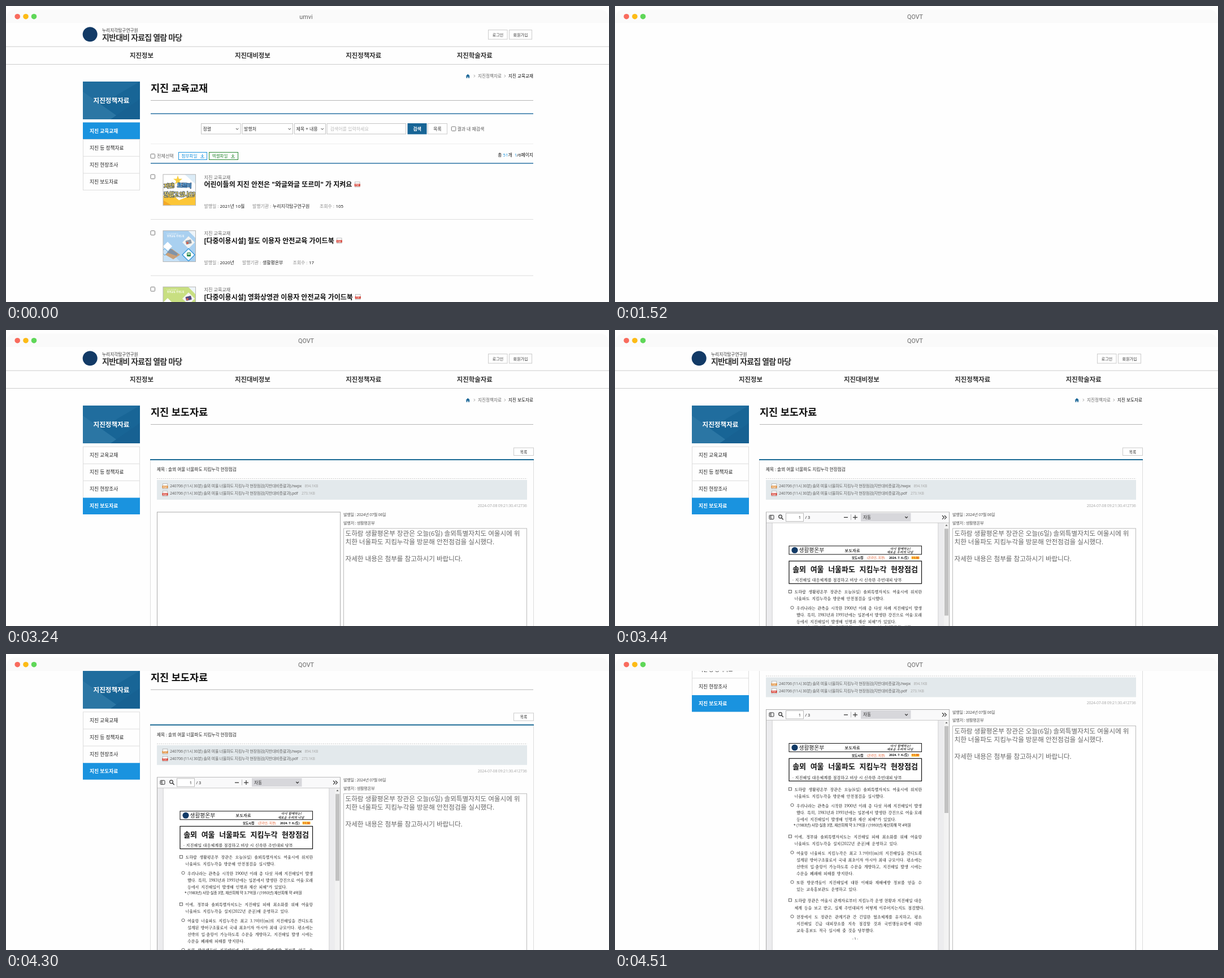
Write an HTML page that moves like this. It is 1067x525 px and loops after 5450 ms.

```html
<!DOCTYPE html>
<html lang="ko">
<head>
<meta charset="utf-8">
<style>
  html, body { margin: 0; width: 100%; height: 100%; overflow: hidden; background: #fefefe; }
  #stage { display: block; width: 100%; height: 100%; font-family: 'Noto Sans', 'Noto Sans CJK KR', sans-serif; }
  foreignObject { overflow: visible; }
  .line { font: 7px/12px 'Noto Serif CJK KR', 'Noto Sans CJK KR', serif; color: #000; white-space: nowrap; word-spacing: 1.5px; }
  .full { white-space: normal; word-spacing: 0; text-align: justify; text-align-last: justify; }
</style>
</head>
<body>
<svg id="stage" viewBox="0 0 1067 525"></svg>
<script>
const LOOP = 5450;
const BOLD = 'font-weight="700"', MID = ' text-anchor="middle"', END = ' text-anchor="end"';
const NAVY = '#186596', SKY = '#1a93df', RULE = '#2a72a3';
const SERIF = ` font-family="'Noto Serif CJK KR','Noto Sans CJK KR',serif"`;
const spacing = px => ` letter-spacing="${px}"`;

// Text is placed by the vertical centre of its glyphs.
const text = (x, y, s, size = 8, fill = '#333', more = '') =>
  `<text x="${x}" y="${y + size * .37}" font-size="${size}" fill="${fill}" ${more}>${s}</text>`;
const box = (x, y, w, h, fill = 'none', stroke = 'none', more = '') =>
  `<rect x="${x}" y="${y}" width="${w}" height="${h}" fill="${fill}" stroke="${stroke}" ${more}/>`;
const rule = (x1, x2, y, color, width = 1, more = '') =>
  `<path d="M${x1} ${y}H${x2}" stroke="${color}" stroke-width="${width}" ${more}/>`;
const stroke = (d, color = '#333', width = 1) =>
  `<path d="${d}" fill="none" stroke="${color}" stroke-width="${width}"/>`;
const poly = (points, fill, more = '') => `<polygon points="${points}" fill="${fill}" ${more}/>`;
const disc = (x, y, r, fill, more = '') => `<circle cx="${x}" cy="${y}" r="${r}" fill="${fill}" ${more}/>`;
const diamond = (x, y, r, fill, more) => poly(`${x - r},${y} ${x},${y - r} ${x + r},${y} ${x},${y + r}`, fill, more);
const checkbox = (x, y) => box(x, y, 7.5, 7.5, '#fff', '#777', 'rx="1.2"');
const fileIcon = (x, y, color = '#d5382c') =>
  box(x + .5, y - 4.5, 8.5, 9, '#fff', '#aaa', 'stroke-width=".8"') +
  box(x - .3, y - 1, 10, 4.2, color) + text(x + 4.7, y + 1.1, 'PDF', 3.6, '#fff', BOLD + MID);

const tabs = ['지진 교육교재', '지진 등 정책자료', '지진 현장조사', '지진 보도자료'];
const tower = '솔뫼 여울 너울파도 지킴누각 현장점검';

const lessons = [
  { title: '어린이들의 지진 안전은 "와글와글 또르미" 가 지켜요', icon: 617, date: '2021년 10월', orgX: 436, org: '누리지각탐구연구원', viewX: 555, views: 105 },
  { title: '[다중이용시설] 철도 이용자 안전교육 가이드북', icon: 585, date: '2020년', orgX: 418, org: '생활평온부', viewX: 507.5, views: 17 },
  { title: '[다중이용시설] 영화상영관 이용자 안전교육 가이드북', icon: 618, date: '2020년', orgX: 418, org: '생활평온부', viewX: 507.5, views: 12 }
];
const news = [
  { title: tower, icon: 545, date: '2024년 07월 06일', orgX: 454, org: '생활평온부', viewX: 543.5, views: 3 },
  { title: '대기진동 관측 장비 ‘더 정확하게! 더 믿을 수 있게!’-대기진동기기 검인마당 개소식 개최', icon: 784, date: '2024년 06월 18일', orgX: 454, org: '풍운청', viewX: 528.5, views: 9 },
  { title: '들녘 가온 지진피해 응급복구를 위한 긴급 재정 지원', icon: 611, date: '2024년 06월 14일', orgX: 454, org: '생활평온부', viewX: 543.5, views: 7 }
];

// Each line: centre y, paragraph mark, text.
const article = [
  [464, '□', '도하람 생활평온부 장관은 오늘(6일) 솔뫼특별자치도 여울시에 위치한'],
  [476, '', '너울파도 지킴누각을 방문해 안전점검을 실시했다.'],
  [492.5, '○', '우리나라는 관측을 시작한 1900년 이래 총 다섯 차례 지진해일이 발생'],
  [504.5, '', '했다. 특히, 1983년과 1993년에는 일본에서 발생한 강진으로 여울·모래'],
  [516.5, '', '등에서 지진해일이 발생해 인명과 재산 피해*가 있었다.'],
  [548, '□', '이에, 정부와 솔뫼특별자치도는 지진해일 피해 최소화를 위해 여울항'],
  [560, '', '너울파도 지킴누각을 설치(2022년 준공)해 운영하고 있다.'],
  [576.5, '○', '여울항 너울파도 지킴누각은 최고 3.7미터(m)의 지진해일을 견디도록'],
  [588.5, '', '설계된 방어구조물로서 국내 최초이자 아시아 최대 규모이다. 평소에는'],
  [600.5, '', '선박의 입·출항이 가능하도록 수문을 개방하고, 지진해일 발생 시에는'],
  [612.5, '', '수문을 폐쇄해 피해를 방지한다.'],
  [629, '○', '또한 방문객들이 지진해일에 대한 이해와 재해예방 정보를 얻을 수'],
  [640.5, '', '있는 교육홍보관도 운영하고 있다.'],
  [661, '□', '도하람 장관은 여울시 관계자로부터 지킴누각 운영 현황과 지진해일 대응'],
  [673.5, '', '체계 등을 보고 받고, 실제 주민대피가 어떻게 이루어지는지도 점검했다.'],
  [690, '○', '현장에서 도 장관은 관계기관 간 긴밀한 협조체계를 유지하고, 평소'],
  [702, '', '지진해일 긴급 대피장소를 지속 점검할 것과 국민행동요령에 대한'],
  [714, '', '교육·홍보도 적극 실시해 줄 것을 당부했다.']
];

function windowBar(title) {
  return '<path d="M0 30Q0 6 16 6H1051Q1067 6 1067 30Z" fill="#fafafa"/>' +
    disc(20.2, 18.7, 4.8, '#f96b5d') + disc(35, 18.7, 4.8, '#fdbb16') + disc(49.5, 18.7, 4.8, '#5fd758') +
    text(531, 18.8, title, 10.8, '#666', MID + ` font-family="Roboto,sans-serif"`);
}

function header() {
  const menu = ['지진정보', '지진대비정보', '지진정책자료', '지진학술자료'];
  return disc(148.7, 50.3, 13, '#123a66') +
    text(170, 43.5, '누리지각탐구연구원', 7.7, '#333') +
    text(170, 56, '지반대비 자료집 열람 마당', 14, '#333', BOLD + spacing(-.8)) +
    box(853.5, 42.5, 33.5, 16.5, '#fff', '#ccc') + text(870.5, 51, '로그인', 7, '#333', MID) +
    box(890.5, 42.5, 40, 16.5, '#fff', '#ccc') + text(910.5, 51, '회원가입', 7, '#333', MID) +
    rule(0, 1067, 72, '#ccc') + rule(0, 1067, 103.5, '#ccc') +
    menu.map((s, i) => text(240 + i * 196.4, 88, s, 11.4, '#333', BOLD + MID)).join('');
}

function sidebar(tab, hover) {
  const shift = tab ? .7 : 0;
  const items = tabs.map((s, i) => {
    const lit = i === tab || i === hover, top = 206.5 + 30.1 * i + shift;
    return (lit ? box(136, top, 101, i === 3 ? 29.5 : 29.8, SKY) : i ? rule(136, 237, top, '#ddd') : '') +
      text(148, 221.3 + 30 * i + shift, s, 8.7, lit ? '#fff' : '#222', lit ? BOLD : '');
  });
  return box(136, 134, 101, 67, NAVY) +
    poly('136,134 237,134 136,193', '#206d9e') +
    poly('136,152 205,201 136,201', '#2b76a4') +
    poly('185,201 237,165 237,201', '#176192') +
    text(186.5, 167.5, '지진정책자료', 11.6, '#fff', BOLD + MID) +
    box(136.5, 207, 100, 119.5, 'none', '#ddd') + items.join('');
}

function heading(tab) {
  return '<path d="M813.5 124.5L817.3 120.7L821 124.5H820V128H818.2V125.5H816.4V128H814.6V124.5Z" fill="#186596"/>' +
    stroke('M827.8 122l2 2.2l-2 2.2M881.8 122l2 2.2l-2 2.2', '#888', .8) +
    text(835, 124.3, '지진정책자료', 7.6, '#666') +
    text(889, 124.3, tabs[tab], 7.6, '#111') +
    text(256, 146, tabs[tab], 17.5, '#111', BOLD) + rule(256, 933, 167.5, '#b5b5b5');
}

function searchForm() {
  const select = (x, w, s) => box(x, 208.5, w, 18.5, '#fff', '#c4c4c4') +
    text(x + 3, 218, s) + stroke(`M${x + w - 8} 217l2.2 2.2l2.2-2.2`);
  const download = (x, w, s, color) => box(x, 259.5, w, 13, '#fff', color) + text(x + 5, 266, s, 7.6, color) +
    stroke(`M${x + 42} 262.5v5m-2.3-2.3l2.3 2.3l2.3-2.3M${x + 38.5} 269.3h7`, color, .9);
  return rule(256, 933, 191, RULE, 1.5) +
    select(345.5, 69.5, '정렬') + select(418, 89.5, '발행처') + select(510.5, 55, '제목 + 내용') +
    box(568, 208.5, 139.5, 18.5, '#fff', '#c4c4c4') + text(573.5, 218, '검색어를 입력하세요', 8, '#bbb') +
    box(710.5, 208, 34, 19.5, NAVY) + text(727.5, 218, '검색', 8, '#fff', BOLD + MID) +
    box(746.5, 208.5, 34, 18.5, '#fff', '#ccc') + text(763.5, 218, '목록', 7.8, '#333', MID) +
    checkbox(788.3, 214) + text(798.5, 218, '결과 내 재검색', 7.9, '#555') +
    rule(256, 933, 244.5, '#eee') +
    checkbox(256, 262.5) + text(267, 266, '전체선택', 8.1, '#666') +
    download(305.5, 50, '첨부파일', SKY) + download(359.5, 51, '엑셀파일', '#2c8a35') +
    rule(256, 933, 279, RULE, 1.7);
}

function lessonCover() {
  const lettering = (x, y, s, size, fill, turn) => text(x, y, s, size, fill,
    BOLD + spacing(-1) + ` stroke="#22385f" stroke-width="1.3" paint-order="stroke" transform="rotate(${turn} ${x} ${y})"`);
  return box(0, 0, 58, 55, '#fff') + poly('0,38 14,34 28,46 58,34 58,55 0,55', '#fcc637') +
    poly('0,55 0,46 15,55', '#f3a928') + poly('38,0 58,0 58,18', '#dcecf7') +
    poly('26,2 28,8 34,8 29,12 31,18 26,14 21,18 23,12 18,8 24,8', '#f9cf3f') +
    lettering(1, 21, '지진!', 10, '#ffdc55', -4) + lettering(25, 19, '또르미', 10, '#63b5ee', 3) +
    lettering(1, 36, '잘 알고 있나요?', 9.8, '#ffe572', 0);
}

function guideCover(ground, accent, emblem) {
  return box(0, 0, 58, 55, ground) + poly('44,0 58,0 58,14', '#eef5fa') +
    poly('0,25 30,55 0,55', '#ffffff', 'opacity=".35"') +
    diamond(8, 28, 8, '#fff') + diamond(3, 38, 6, 'none', `stroke="${accent}"`) +
    diamond(45, 21, 11, '#f3f3f1') + diamond(45, 43, 11, '#fff', `stroke="${accent}" stroke-width="1.5"`) +
    poly('4,43 15,32 30,43 18,51', '#c9a078') + poly('7,39 13,32 26,41 24,45', '#7f93a8') +
    box(40, 17, 10, 7, emblem, 'none', 'rx="1" transform="rotate(-15 45 20)"') + disc(43, 22, 2, '#d35d4b') +
    box(42, 39, 7, 7, '#2f8a50', 'none', 'rx="1.5"') + box(43, 40.5, 5, 2.2, '#d9f0df') +
    text(6, 5.5, '누구나 쉽게 배우는', 2.7, '#fff') + text(7, 10, '안전교육 가이드북', 4, '#fff', BOLD);
}

function newsCover() {
  return box(0, 0, 58, 55, '#fff') + disc(21, 34.5, 16.5, '#d9cfc6') + disc(34.7, 21, 17, '#425a8a') +
    stroke('M14 8v4h4', '#425a8a', 1.6) + rule(5, 13, 16.5, '#e5b98c') + rule(42, 51, 40, '#7aa3c8') +
    box(3.5, 21.5, 2, 2, '#425a8a') + box(52, 34, 2.5, 2.5, '#e6a35b') + stroke('M38 45h3v3', '#d9a57e');
}

function list(tab, withCovers) {
  const isNews = tab === 3;
  const covers = isNews ? [newsCover(), newsCover(), newsCover()] :
    [lessonCover(), guideCover('#a9d0f0', '#3d9bdc', '#8f9aa5'), guideCover('#c8df81', '#63b4cf', '#514a80')];
  const field = (x, y, label, gap, value) =>
    text(x, y, label + ' :', 7.9, '#888') + text(x + gap, y, value, 7.9, '#222');
  const rows = (isNews ? news : lessons).map((row, i) => {
    const y = 298.5 + i * 99.7;
    return checkbox(256, y + .5) +
      (withCovers ? `<svg x="278" y="${y}" width="57.5" height="55">${covers[i]}</svg>` : '') +
      box(278, y + .3, 57.5, 55, 'none', '#b5b5b5') +
      text(350.5, y + 5.3, tabs[tab], 8.1, '#666') +
      text(350.5, y + 18.3, row.title, 12, '#111', BOLD) + fileIcon(row.icon, y + 18) +
      field(350.5, y + 57, '발행일', 28, row.date) + field(row.orgX, y + 57, '발행기관', 36, row.org) +
      field(row.viewX, y + 57, '조회수', 28.5, row.views) + rule(256, 933, y + 80, '#ddd');
  });
  const blue = s => `<tspan fill="${SKY}">${s}</tspan>`;
  return searchForm() + text(933, 264.5, isNews ? `총 ${blue(321)}개 &#160;${blue(1)}/33페이지`
    : `총 ${blue(51)}개 &#160;${blue(1)}/6페이지`, 7.8, '#111', END) + rows.join('');
}

function documentPage() {
  let x = 0;
  const body = article.map(([y, mark, s]) => {
    if (mark) x = mark === '□' ? 317.5 : 321;
    const sign = mark === '□' ? box(307.5, y - 2.5, 5, 5, 'none', '#222', 'stroke-width=".7"')
      : mark ? disc(313.5, y, 2.6, 'none', 'stroke="#222" stroke-width=".7"') : '';
    const full = s.endsWith('다.') ? '' : ' full';
    return sign + `<foreignObject x="${x}" y="${y - 6}" width="${543 - x}" height="13"><div class="line${full}">${s}</div></foreignObject>`;
  });
  const slant = BOLD + MID + ' font-style="italic"' + SERIF;
  return box(308, 383, 234.5, 15, '#fff', '#111') + disc(318, 390.5, 5.6, '#123a66') +
    text(325.5, 390.5, '생활평온부', 9.7, '#222') + text(420, 391, '보도자료', 7.1, '#111', BOLD + MID + SERIF) +
    text(505, 387.5, '다시 함께하는!', 5.6, '#111', slant) + text(504, 393.7, '새로운 우리의 나날', 5.6, '#111', slant) +
    text(419, 404, '보도시점', 5.5, '#111', BOLD) + text(446, 404, '(온라인, 지면)', 5.5, '#e05a2b') +
    text(485, 404, '2024. 7. 6.(토)', 5.4, '#111', BOLD) +
    box(524.5, 401.5, 14, 5, '#ffc934') + text(531.5, 404, '11:30', 5, '#d8432a', BOLD + MID) +
    box(308, 409.8, 234.5, 40, '#fff', '#111', 'stroke-width="1.2"') +
    text(425, 424, tower, 13, '#111', BOLD + MID + ' word-spacing="4.2"') +
    text(313.5, 443.5, '- 지진해일 대응체계를 점검하고 비상 시 신속한 주민대피 당부', 7.2, '#000', SERIF) +
    body.join('') +
    text(316, 528, '* (1983년) 사망·실종 3명, 재산피해 약 3.7억원 / (1993년) 재산피해 약 4억원', 6.5, '#222') +
    text(425, 729, '- 1 -', 6, '#222', MID);
}

// Stage 0: empty, 1: toolbar, 2: blank sheet, 3: document.
function viewer(stage) {
  let out = box(267.5, 323, 324, 500, '#fff', '#aaa');
  if (stage > 1) out += box(268, 342, 314, 480, '#ececee') + box(277.5, 342, 295, 480, '#dcdcde') +
    box(279, 342, 292, 480, '#fff') + box(582, 342, 9, 480, '#f2f2f2') +
    box(583, 352.5, 7, 154, '#c1c1c1') + poly('584.5,347.5 588.5,347.5 586.5,345', '#555');
  if (stage > 2) out += documentPage();
  if (stage > 0) out += box(268, 323.5, 323, 18, '#f9f9fa') + rule(268, 591, 342, '#c9c9c9') +
    box(273, 328.5, 8, 7, 'none', '#333', 'rx="1"') + stroke('M276 328.5v7M274 330.5h1M274 332.5h1') +
    disc(292.5, 331, 2.8, 'none', 'stroke="#333" stroke-width="1.2"') + stroke('M294.7 333.2l3 3', '#333', 1.4) +
    box(302.5, 325, 31, 14.5, '#fff', '#bbb') + text(329, 332.3, '1', 7.3, '#222', END) + text(336.5, 332.3, '/ 3', 7.3, '#222') +
    stroke('M405 332.3h7M421 332.3h8M425 328.3v8', '#333', 1.2) + stroke('M417.5 327v10', '#bbb') +
    box(435, 324.5, 88.5, 15, '#d7d7db') + text(439, 332, '자동', 7.5, '#222') +
    stroke('M513.3 331l2.3 2.3l2.3-2.3M579 329l3.3 3.3l-3.3 3.3M583 329l3.3 3.3l-3.3 3.3', '#333', 1.2);
  return out;
}

function detail(stage) {
  const file = (y, extension, size, sizeX, color) => fileIcon(276.8, y + .5, color) +
    text(290, y, `240706 (11시 30분) ${tower}(지반대비총괄과).${extension}`, 7.2, '#666', spacing(-.3)) +
    text(sizeX, y, size, 6.8, '#aaa', spacing(-.35));
  const memo = ['도하람 생활평온부 장관은 오늘(6일) 솔뫼특별자치도 여울시에 위',
    '치한 너울파도 지킴누각을 방문해 안전점검을 실시했다.', '', '자세한 내용은 첨부를 참고하시기 바랍니다.'];
  return box(898.5, 209, 35, 13.5, '#fff', '#ccc') + text(916, 216, '목록', 6.8, '#333', MID) +
    stroke('M255.5 230V900M933.5 230V900', '#ddd') + rule(255, 934, 230, '#1a6a94', 2) +
    text(267, 247, '제목 : ' + tower, 7.66, '#222') +
    rule(267, 922, 263.5, '#ccc', 1, 'stroke-dasharray="2 1.5"') + box(267, 266, 655, 35, '#e3e9ec') +
    file(276.7, 'hwpx', '894.1KB', 528.5, '#e08b35') + file(289.7, 'pdf', '273.1KB', 523) +
    text(921.5, 311.3, '2024-07-08 09:21:30.412736', 7, '#aaa', END + spacing(-.2)) +
    text(597, 327.7, '발행일 : 2024년 07월 06일', 7.2, '#555', spacing(-.35)) +
    text(597, 342.3, '발행저 : 생활평온부', 7.2, '#555', spacing(-.3)) +
    box(597.5, 352, 324, 500, '#fff', '#bbb') +
    memo.map((s, i) => text(600.5, 360.8 + i * 15.1, s, 11.6, '#666', 'font-weight="300"')).join('') + viewer(stage);
}

function scrollAt(t) {
  if (t < 4160) return 0;
  const held = 4160 + Math.floor((t - 4160) / 70) * 70;
  const p = Math.min(1, (held - 4127.5) / 353.6);
  return 224.5 * (p < .5 ? 4 * p ** 3 : 1 - 4 * (1 - p) ** 3);
}

function stateAt(t) {
  return {
    title: t < 1190 ? 'umvi' : 'QOVT',
    tab: t < 1520 ? 0 : 3,
    hover: t >= 1190 ? 3 : -1,
    blank: t >= 1520 && t < 1590,
    covers: t < 1520 || t >= 1660,
    viewer: [3240, 3310, 3380, 3440].filter(start => t >= start).length - 1,
    scroll: scrollAt(t)
  };
}

function draw(s) {
  const page = s.blank ? '' : header() + sidebar(s.tab, s.hover) + heading(s.tab) +
    (s.viewer < 0 ? list(s.tab, s.covers) : detail(s.viewer));
  return box(0, 0, 1067, 525, '#fefefe') +
    `<svg y="30" width="1067" height="495"><g transform="translate(0 ${-30 - s.scroll})">${page}</g></svg>` +
    windowBar(s.title);
}

const stage = document.getElementById('stage');
const start = performance.now();
let shown = '';
function tick() {
  const state = stateAt((performance.now() - start) % LOOP), key = JSON.stringify(state);
  if (key !== shown) {
    stage.innerHTML = draw(state);
    shown = key;
  }
  requestAnimationFrame(tick);
}
tick();
</script>
</body>
</html>
```
